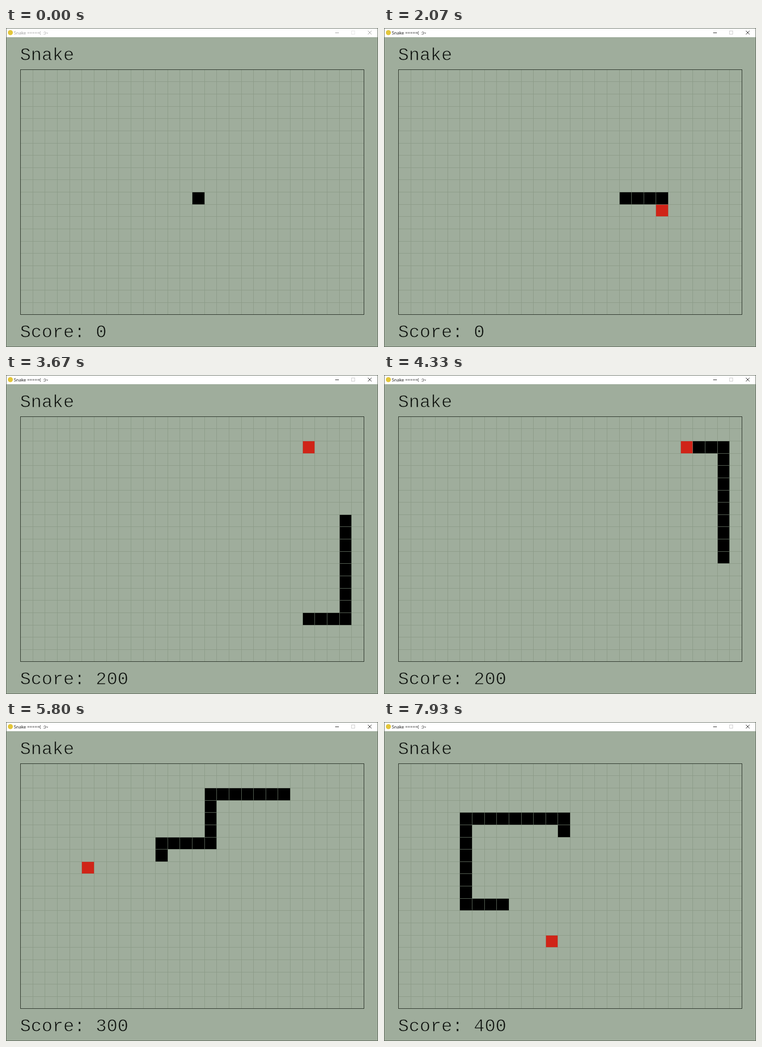
Write an HTML page with a canvas that moves like this. It is 808x693 px and loops after 8000 ms.

```html
<!DOCTYPE html>
<html lang="en">
<head>
<meta charset="utf-8">
<title>Snake</title>
<style>
  html, body { margin: 0; width: 808px; height: 693px; overflow: hidden; background: #9fad9c; }
  canvas { display: block; }
</style>
</head>
<body>
<canvas id="stage" width="808" height="693"></canvas>
<script>
const ctx = document.getElementById('stage').getContext('2d');
const W = 808, H = 693, LOOP = 8000, TICK = 200 / 3;
const COLS = 28, ROWS = 20, PITCH = 26.63;
const BG = '#9fad9c', GRID = '#8b9a87', INK = '#101410', FOOD = '#d02418';

// Corners of the snake's route, in cells
const corners = [[14, 10], [21, 10], [21, 16], [26, 16], [26, 2], [15, 2],
  [15, 6], [11, 6], [11, 11], [5, 11], [5, 4], [13, 4], [13, 5]];
const foods = [[21, 11], [22, 16], [23, 2], [5, 8], [12, 14]];
const FOOD_TICK = 22;

const route = [corners[0]];
for (const [cx, cy] of corners.slice(1)) {
  let [x, y] = route[route.length - 1];
  while (x !== cx || y !== cy) {
    x += Math.sign(cx - x);
    y += Math.sign(cy - y);
    route.push([x, y]);
  }
}
const stepOf = ([x, y]) => route.findIndex(c => c[0] === x && c[1] === y);
const meals = foods.map(stepOf).filter(s => s > 0);

const clamp = (v, lo, hi) => Math.max(lo, Math.min(hi, v));
const lineX = i => Math.round(31.2 + i * PITCH);
const lineY = i => Math.round(89.8 + i * PITCH);

function rect(x, y, w, h, color) {
  ctx.fillStyle = color;
  ctx.fillRect(x, y, w, h);
}

function frame(x, y, w, h, color) {
  ctx.strokeStyle = color;
  ctx.lineWidth = 1;
  ctx.strokeRect(x + 0.5, y + 0.5, w - 1, h - 1);
}

function cell([c, r], color) {
  const x = lineX(c), y = lineY(r);
  const w = lineX(c + 1) - x, h = lineY(r + 1) - y;
  ctx.globalAlpha = 0.15;
  rect(x, y, w + 1, h + 1, color);
  ctx.globalAlpha = 1;
  rect(x + 1, y + 1, w - 1, h - 1, color);
}

function label(text, y) {
  ctx.font = '39.2px "Liberation Mono", "Courier New", monospace';
  ctx.fillStyle = INK;
  ctx.fillText(text, 30.5, y);
  // Thin the strokes a little
  ctx.strokeStyle = BG;
  ctx.lineWidth = 0.9;
  ctx.strokeText(text, 30.5, y);
}

function titleBar(active) {
  const color = active ? '#111' : '#999';
  rect(0, 0, W, 20, '#fff');
  ctx.fillStyle = '#e3c63a';
  ctx.beginPath();
  ctx.arc(9.5, 10, 5.5, 0, Math.PI * 2);
  ctx.fill();
  ctx.font = '9.5px "Open Sans", "Noto Sans", sans-serif';
  ctx.fillStyle = color;
  ctx.fillText('Snake =====(  :)~', 17, 14);
  rect(715, 10, 8, 1, color);
  frame(750, 6, 8, 8, active ? '#c8c8c8' : '#e4e4e4');
  ctx.strokeStyle = color;
  ctx.beginPath();
  ctx.moveTo(786, 6);
  ctx.lineTo(794, 14);
  ctx.moveTo(794, 6);
  ctx.lineTo(786, 14);
  ctx.stroke();
}

function board() {
  const x0 = lineX(0), y0 = lineY(0), x1 = lineX(COLS), y1 = lineY(ROWS);
  for (let i = 1; i < COLS; i++) rect(lineX(i), y0, 1, y1 - y0, GRID);
  for (let i = 1; i < ROWS; i++) rect(x0, lineY(i), x1 - x0, 1, GRID);
}

// The snake advances on four ticks out of five
function stepsAt(n) {
  const shift = n > 83 && n < 119 ? 1 : 0;
  return clamp(n - Math.floor((n + shift) / 5) - 18, 0, route.length - 1);
}

function draw(t) {
  const n = Math.floor((t + 3.4) / TICK) % 120;
  const step = stepsAt(n);
  const eaten = meals.filter(m => m <= step).length;
  // Each meal adds four cells, one per step
  const size = meals.reduce((sum, m) => sum + clamp(step - m, 0, 4), 1 + Math.min(step, 3));

  rect(0, 0, W, H, BG);
  titleBar(n > 0);
  board();
  if (n >= FOOD_TICK) cell(foods[eaten], FOOD);
  route.slice(step - size + 1, step + 1).forEach(c => cell(c, '#000'));
  frame(lineX(0), lineY(0), lineX(COLS) - lineX(0) + 1, lineY(ROWS) - lineY(0) + 1, '#1c251b');
  label('Snake', 70);
  label('Score: ' + eaten * 100, 672);
  frame(0, 0, W, H, '#566053');
}

const start = performance.now();
function loop() {
  draw((performance.now() - start) % LOOP);
  requestAnimationFrame(loop);
}
loop();
</script>
</body>
</html>
```
